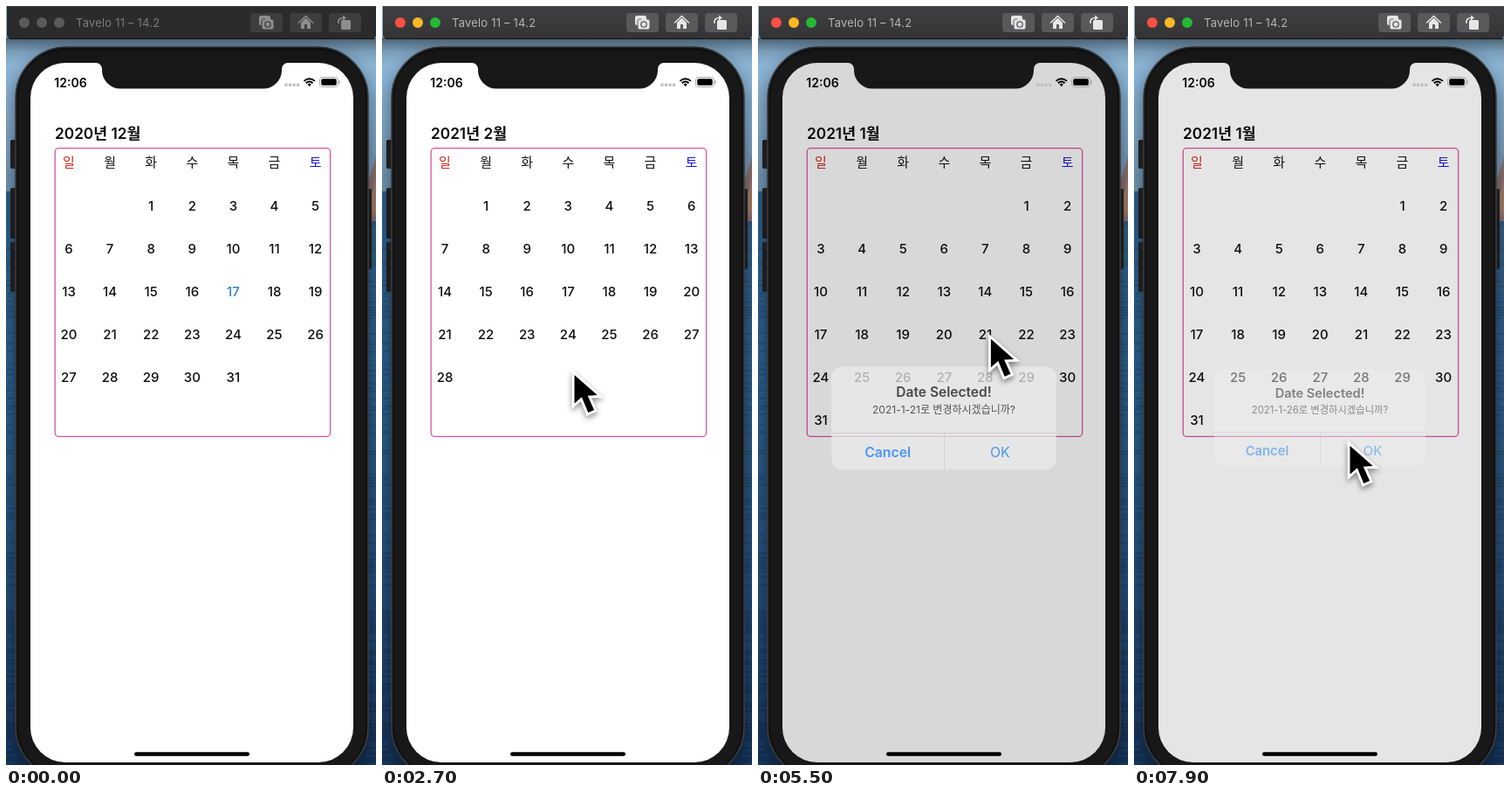
An HTML page with a canvas for the animation above (8 s loop, 424 by 868 pixels).

```html
<!DOCTYPE html>
<html lang="ko">
<head>
<meta charset="utf-8">
<title>Calendar</title>
<style>
html, body { margin: 0; width: 100%; height: 100%; overflow: hidden; background: #173a5c; }
canvas { display: block; width: 424px; height: 868px; }
</style>
</head>
<body>
<canvas id="stage"></canvas>
<script>
const W = 424, H = 868, LOOP = 8000, STEP = 100;
const PAGE = 334, COL = 47.1, ROW = 49.1;
const DRAG = 118, DRAG_MS = 300, SLIDE_MS = 600, ENTER = 150;
const DAYS = '일월화수목금토';
const FONT = 'Inter, "Noto Sans CJK KR", "Noto Sans CJK", sans-serif';
const OK = { x: 247, y: 503 };
const SCREEN = [28, 65, 370, 800];

// dir 1 pulls the next month in, -1 the previous one
const SWIPES = [
  { at: 900, x: 300, y: 440, dir: 1 },
  { at: 1855, x: 236, y: 437, dir: 1 },
  { at: 2750, x: 220, y: 422, dir: 1 },
  { at: 3500, x: 102, y: 422, dir: -1 },
  { at: 4500, x: 136, y: 397, dir: -1 }
];
const ALERTS = [{ day: 21, open: 5400, close: 6400 }, { day: 26, open: 7250, close: 7800 }];

const canvas = document.getElementById('stage');
const dpr = window.devicePixelRatio || 1;
canvas.width = W * dpr;
canvas.height = H * dpr;
const c = canvas.getContext('2d');

const clamp = v => Math.max(0, Math.min(1, v));
const smooth = u => u * u * (3 - 2 * u);

function monthInfo(index) {
  const first = new Date(2020, 11 + index, 1);
  const year = first.getFullYear(), m = first.getMonth();
  return { year, m, lead: first.getDay(), count: new Date(year, m + 1, 0).getDate() };
}

function cellAt(info, day) {
  const i = info.lead + day - 1;
  return { x: 72 + (i % 7) * COL, y: 228.5 + Math.floor(i / 7) * ROW };
}

// The pointer's stops follow from the swipes and taps.
function pointerStops() {
  const stops = [{ t: ENTER, x: 440, y: 530 }];
  const rest = (t0, t1, x, y) => stops.push({ t: t0, x, y }, { t: t1, x, y });
  SWIPES.forEach(({ at, x, y, dir }) => {
    rest(at - 200, at, x, y);
    rest(at + DRAG_MS, at + DRAG_MS + 100, x - dir * DRAG, y);
  });
  ALERTS.forEach(({ day, open, close }) => {
    const cell = cellAt(monthInfo(1), day);
    rest(open - 200, open + 100, cell.x + 6, cell.y + 5);
    rest(close - 100, close, OK.x, OK.y);
  });
  // each swipe begins exactly where its rest ends
  return stops.sort((a, b) => a.t - b.t);
}
const STOPS = pointerStops();

function pointerAt(t) {
  const next = STOPS.findIndex(s => s.t > t);
  if (next < 0) return STOPS[STOPS.length - 1];
  const a = STOPS[next - 1], b = STOPS[next];
  const e = smooth((t - a.t) / (b.t - a.t));
  return { x: a.x + (b.x - a.x) * e, y: a.y + (b.y - a.y) * e };
}

const scrollAt = t =>
  SWIPES.reduce((pos, s) => pos + s.dir * smooth(clamp((t - s.at) / SLIDE_MS)), 0);

function box(x, y, w, h, r, fill) {
  c.beginPath();
  c.roundRect(x, y, w, h, r);
  if (fill) { c.fillStyle = fill; c.fill(); }
}

function line(color, width) {
  c.strokeStyle = color;
  c.lineWidth = width;
  c.stroke();
}

function poly(points, fill) {
  c.beginPath();
  points.forEach(([x, y]) => c.lineTo(x, y));
  c.closePath();
  if (fill) { c.fillStyle = fill; c.fill(); }
}

function disc(x, y, r, fill) {
  c.beginPath();
  c.arc(x, y, r, 0, 7);
  c.fillStyle = fill;
  c.fill();
}

function text(s, x, y, size, color, weight = 400, align = 'center') {
  c.font = `${weight} ${size}px ${FONT}`;
  c.textAlign = align;
  c.fillStyle = color;
  c.fillText(s, x, y + size * 0.365);
}

function fade(y0, y1, ...colors) {
  const g = c.createLinearGradient(0, y0, 0, y1);
  colors.forEach((color, i) => g.addColorStop(i / (colors.length - 1), color));
  return g;
}

function wallpaper() {
  c.fillStyle = fade(38, 212, '#8fb9da', '#86b0d2', '#7095b4');
  c.fillRect(0, 0, W, 212);
  c.fillStyle = fade(212, H, '#2f5f8a', '#2a5f8f', '#234f7c', '#15335a');
  c.fillRect(0, 212, W, H);
  poly([[W, 172], [416, 198], [410, 208], [410, 246], [W, 246]], '#8f7270');
  poly([[W, 200], [414, 232], [W, 240]], '#a77e6c');
  let seed = 7;
  const rnd = () => (seed = (seed * 16807) % 2147483647) / 2147483647;
  for (let y = 250; y < H; y += 3) {
    c.fillStyle = rnd() < 0.5 ? 'rgba(5,20,45,.2)' : 'rgba(110,160,200,.1)';
    c.fillRect(rnd() * 6 - 3, y, 6 + rnd() * 6, 1.2);
    c.fillRect(412 + rnd() * 6, y + 1, 8, 1.2);
  }
}

function icons(ink, back) {
  [280, 325, 370].forEach(x => box(x, 8, 37, 22, 4, back));
  // camera
  box(290, 11, 13, 11, 2, ink);
  box(293, 15, 14, 12, 2.5, ink);
  line(back, 1);
  box(297, 13.5, 6, 4, 1, ink);
  c.beginPath();
  c.arc(300, 21, 3.2, 0, 7);
  line(back, 1.3);
  // home
  poly([[338, 19], [343.5, 13.5], [349, 19], [349, 26], [338, 26]], ink);
  c.beginPath();
  c.moveTo(335, 19.5);
  c.lineTo(343.5, 11.5);
  c.lineTo(352, 19.5);
  line(ink, 1.5);
  box(342, 21, 3, 5, 0, back);
  // rotate
  box(384, 16, 11, 11, 1.5, ink);
  c.beginPath();
  c.moveTo(381, 20);
  c.quadraticCurveTo(380, 13.5, 387, 13.5);
  line(ink, 1.5);
  poly([[386, 10.5], [390, 13.5], [386, 16.5]], ink);
}

function titleBar(active) {
  box(0, 36, W, 32, 0, fade(38, 68, 'rgba(0,0,0,.45)', 'rgba(0,0,0,.13)', 'rgba(0,0,0,0)'));
  box(1, 0, 423, 38, [0, 0, 5, 5], active ? fade(0, 38, '#404042', '#333335') : '#2b2b2c');
  box(2, 0, W, 1, 0, active ? '#515153' : '#414143');
  box(4, 37, 418, 1, 0, '#111');
  ['#ff4f46', '#fbb724', '#25b935'].forEach((color, i) =>
    disc(21 + i * 20, 19, 6, active ? color : '#5a5a5b'));
  c.letterSpacing = '0.2px';
  text('Tavelo 11 – 14.2', 80, 19.5, 13, active ? '#b5b5b6' : '#7b7b7c', 400, 'left');
  c.letterSpacing = '0px';
  if (active) icons('#e6e6e6', '#59595b');
  else icons('#8d8d8e', '#3d3d3e');
}

function phone() {
  c.save();
  c.shadowColor = 'rgba(0,0,0,.5)';
  c.shadowBlur = 24 * dpr;
  c.shadowOffsetY = 10 * dpr;
  box(11, 47, 404, 836, 58, '#181818');
  c.restore();
  [[153, 33], [208, 58], [270, 57]].forEach(([y, h]) => box(5, y, 9, h, 2, '#1d1d1e'));
  box(410, 209, 9, 92, 2, '#1d1d1e');
  box(11, 47, 404, 836, 58, '#181818');
  line('#3b3d40', 1.5);
  box(13, 49, 400, 832, 56);
  line('#0c0c0c', 1);
}

function notch() {
  c.beginPath();
  c.moveTo(103, 64);
  c.lineTo(103, 65);
  c.arcTo(110, 65, 110, 72, 7);
  c.arcTo(110, 94.5, 135, 94.5, 21);
  c.arcTo(316, 94.5, 316, 72, 21);
  c.arcTo(316, 65, 323, 65, 7);
  c.lineTo(323, 64);
  c.fillStyle = '#181818';
  c.fill();
}

function statusBar() {
  text('12:06', 74, 87.5, 14, '#000', 600);
  for (let i = 0; i < 4; i++) box(319.5 + i * 4.5, 88.5, 3.2, 3.4, 0.8, '#bfbfbf');
  [8.7, 5.4].forEach(r => {
    c.beginPath();
    c.arc(347.7, 92, r, -Math.PI * 0.75, -Math.PI * 0.25);
    line('#000', 2);
  });
  poly([[345.5, 89.6], [347.7, 88.6], [349.9, 89.6], [347.7, 92.2]], '#000');
  box(359.5, 81.5, 21, 11, 3);
  line('#a8a8a8', 1);
  box(361.2, 83.2, 17.6, 7.6, 1.8, '#000');
  box(381.5, 85, 1.3, 4, 0.6, '#a8a8a8');
  box(147, 853.2, 132, 4.6, 2.3, '#000');
}

function month(index, dx) {
  const info = monthInfo(index);
  c.save();
  c.translate(dx, 0);
  text(`${info.year}년 ${info.m + 1}월`, 56, 146, 17.25, '#0a0a0a', 600, 'left');
  box(56.2, 162.7, 315.4, 329.6, 4);
  line('#d9539f', 1.3);
  [...DAYS].forEach((d, i) =>
    text(d, 72 + i * COL, 179, 15, i === 0 ? '#d8261f' : i === 6 ? '#1d18cf' : '#151515'));
  for (let d = 1; d <= info.count; d++) {
    const { x, y } = cellAt(info, d);
    text(d, x, y, 15, index === 0 && d === 17 ? '#2b80da' : '#0e0e0e', 450);
  }
  c.restore();
}

function calendar(pos) {
  c.save();
  c.beginPath();
  c.rect(46, 120, PAGE, 390);
  c.clip();
  const base = Math.floor(pos);
  month(base, (base - pos) * PAGE);
  if (pos > base) month(base + 1, (base + 1 - pos) * PAGE);
  c.restore();
}

function alertBox({ day, open, close }, t) {
  const closing = t >= close;
  const p = closing ? clamp(1 - (t - close) / 200) : 1 - Math.pow(1 - clamp((t - open) / 400), 5);
  if (p <= 0) return;
  box(...SCREEN, 0, `rgba(0,0,0,${0.2 * p})`);
  const k = closing ? 1 : 1 + 0.27 * (1 - p);
  c.save();
  c.globalAlpha = p * 0.96;
  c.translate(213, 471.3);
  c.scale(k, k);
  box(-121, -55.5, 242, 111, 12, '#ececec');
  text('Date Selected!', 0, -28.5, 14.6, '#111', 600);
  text(`2021-1-${day}로 변경하시겠습니까?`, 0, -9.5, 11.3, '#222');
  box(-121, 15.8, 242, 0.8, 0, '#c4c4c6');
  box(0, 16, 0.8, 39.5, 0, '#c4c4c6');
  text('Cancel', -60.5, 36.8, 14.8, '#0f7bf5', 600);
  text('OK', 60.5, 36.8, 14.8, '#0f7bf5');
  c.restore();
}

function pointer(t) {
  if (t < ENTER) return;
  const { x, y } = pointerAt(t);
  c.save();
  c.translate(x + 0.5, y);
  c.scale(1.05, 1.05);
  poly([[0, 0], [0, 31], [8, 24], [15, 41], [21.5, 38], [14.5, 22.5], [25, 22]]);
  c.miterLimit = 3;
  c.shadowColor = 'rgba(0,0,0,.45)';
  c.shadowBlur = 6 * dpr;
  c.shadowOffsetY = 3 * dpr;
  line('#fff', 5.5);
  c.shadowColor = 'transparent';
  c.fillStyle = '#000';
  c.fill();
  c.restore();
}

function draw(t) {
  c.setTransform(dpr, 0, 0, dpr, 0, 0);
  wallpaper();
  phone();
  titleBar(t >= 600);
  c.save();
  box(...SCREEN, 40, '#fff');
  c.clip();
  calendar(scrollAt(t));
  ALERTS.forEach(a => alertBox(a, t));
  statusBar();
  c.restore();
  notch();
  pointer(t);
}

const start = performance.now();
function tick() {
  const t = (performance.now() - start) % LOOP;
  draw(Math.floor(t / STEP) * STEP);
  requestAnimationFrame(tick);
}
tick();
</script>
</body>
</html>
```
